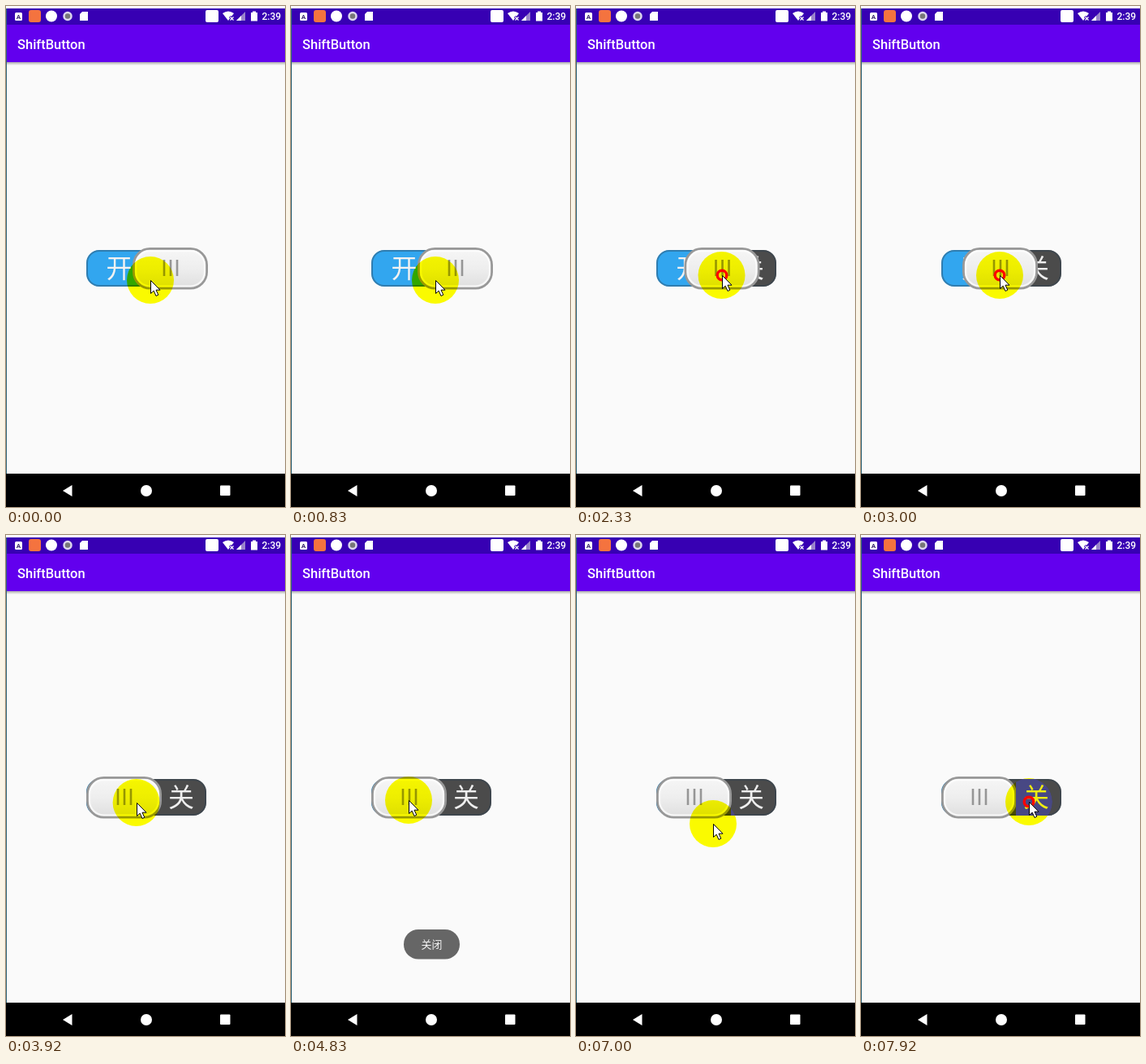
Recreate the animation shown at these times as an HTML page. Size 344 by 616 pixels, loop 8 s.

```html
<!DOCTYPE html>
<html lang="en">
<head>
<meta charset="utf-8">
<title>Toggle demo</title>
<style>
  html, body { margin: 0; width: 100%; height: 100%; overflow: hidden; background: #fafafa; }
  svg { display: block; width: 100vw; height: 100vh; }
  text { font-family: Roboto, sans-serif; font-weight: 500; }
  .cjk { font-family: "Noto Sans CJK SC", "Noto Sans CJK", sans-serif; font-weight: 400; text-anchor: middle; }
  .big { font-size: 32px; font-weight: 500; }
  .soft { filter: blur(.5px); }
  #spot { mix-blend-mode: multiply; }
</style>
</head>
<body>
<svg viewBox="0 0 344 616">
  <defs>
    <linearGradient id="silver" x2="0" y2="1">
      <stop offset="0" stop-color="#f6f6f6"/>
      <stop offset=".5" stop-color="#eee"/>
      <stop offset="1" stop-color="#dedede"/>
    </linearGradient>
    <linearGradient id="shade" x2="0" y2="1">
      <stop offset="0" stop-color="#777" stop-opacity=".6"/>
      <stop offset="1" stop-color="#777" stop-opacity="0"/>
    </linearGradient>
    <clipPath id="trackClip"><rect x="99" y="300" width="148" height="45" rx="16"/></clipPath>
    <clipPath id="offClip"><rect id="offArea" y="300" width="160" height="45"/></clipPath>
    <clipPath id="spotClip"><circle id="spotArea" r="29"/></clipPath>
  </defs>

  <!-- screen -->
  <rect width="344" height="616" fill="#fafafa"/>
  <rect width="344" height="3" fill="#fff"/>
  <rect y="3" width="344" height="20" fill="#3700b3"/>
  <rect y="23" width="344" height="46" fill="#6200ee"/>
  <rect y="69" width="344" height="4" fill="url(#shade)"/>
  <rect y="3" width="1" height="572" fill="#2f6478"/>
  <text x="14" y="53" font-size="16.5" fill="#fff">ShiftButton</text>

  <!-- status bar -->
  <g fill="#fff">
    <rect x="11" y="8" width="9" height="10" rx="1.5"/>
    <text x="15.5" y="16" font-size="8" text-anchor="middle" style="fill:#33206a;font-weight:700">A</text>
    <rect x="28" y="5" width="15" height="15" rx="3" fill="#f4733f"/>
    <circle cx="56" cy="12.5" r="7"/>
    <circle cx="76" cy="12.5" r="4.5" fill="#777" stroke="#ddd6ee" stroke-width="2.5"/>
    <path d="M94 7h7v11h-10v-8z"/>
    <rect x="246" y="5" width="16" height="15" rx="2"/>
    <path d="M267 9q7-5 14 0l-7 9z"/>
    <path d="M276 13l5 5m0-5l-5 5" stroke="#3700b3" stroke-width="3"/>
    <path d="M276.5 13.5l4 4m0-4l-4 4" stroke="#fff" stroke-width="1.2"/>
    <path d="M284 18l11-11v11z" fill="#9a84cc"/>
    <path d="M284 18l6-6v6z"/>
    <path d="M302 8h2v-1.5h4v1.5h2v10.5h-8z"/>
    <text x="315.5" y="17" font-size="12">2:39</text>
  </g>

  <!-- navigation bar -->
  <rect y="575" width="344" height="41" fill="#000"/>
  <g fill="#fff">
    <path d="M70 596l11.5-7v14z"/>
    <circle cx="173" cy="596" r="7"/>
    <rect x="264" y="589.5" width="12.5" height="12.5" rx="1"/>
  </g>

  <!-- toggle -->
  <g class="soft">
    <g clip-path="url(#trackClip)">
      <rect x="99" y="300" width="74" height="45" fill="#32a6ef"/>
      <rect x="173" y="300" width="74" height="45" fill="#4b4b4b"/>
    </g>
    <rect x="100" y="301" width="146" height="43" rx="15" fill="none" stroke="#2c4050" stroke-opacity=".4" stroke-width="2"/>
    <text class="cjk big" x="139.5" y="334" fill="#f2f2f2">开</text>
    <text class="cjk big" x="216" y="334" fill="#eee">关</text>
  </g>
  <g id="thumb" class="soft">
    <rect x="1.5" y="298.5" width="90" height="48.5" rx="20" fill="url(#silver)" stroke="#989898" stroke-width="3"/>
    <rect x="4" y="301" width="85" height="43.5" rx="17.5" fill="none" stroke="#fff" stroke-opacity=".7" stroke-width="2.5"/>
    <path d="M39 312v20m8-20v20m8-20v20" stroke="#969696" stroke-width="2.6"/>
  </g>

  <g id="toast">
    <rect x="139" y="485" width="69" height="36.5" rx="18" fill="#666"/>
    <text class="cjk" x="173.5" y="508" font-size="13" fill="#f4f4f4">关闭</text>
  </g>

  <!-- pointer -->
  <circle id="spot" r="29" fill="#ff0"/>
  <g clip-path="url(#trackClip)"><g clip-path="url(#offClip)"><g clip-path="url(#spotClip)">
    <rect x="99" y="300" width="148" height="45" fill="#484884"/>
    <text class="cjk big" x="216" y="334" fill="#f0ee10">关</text>
  </g></g></g>
  <g id="pointer">
    <circle id="ring" r="5.8" fill="none" stroke="#f00" stroke-width="3.4"/>
    <path d="M.5.5v16l3.7-3.3 2.8 6.3 2.8-1.3-2.8-6h5z" fill="#fff" stroke="#000"/>
  </g>
</svg>
<script>
// Times are in ticks, twelve per second.
const LOOP = 8000, TICKS = 96;
const PRESS = 20, RELEASE = 42, PRESS_AGAIN = 95;
const THUMB_LEFT = 99, THUMB_RIGHT = 156, THUMB_WIDTH = 92;

const HOME = { x: 178, y: 337 };
const MOVES = [
  { from: 15, to: 20, x: 187, y: 331 },
  { from: 21, to: 36, x: 171, y: 331 },
  { from: 45, to: 50, x: 145, y: 326 },
  { from: 65, to: 74, x: 148, y: 324 },
  { from: 78, to: 81, x: 169, y: 355 },
  { from: 87, to: 91, x: 207, y: 328 }
];

const part = id => document.getElementById(id);
const set = (id, values) => {
  for (const key in values) part(id).setAttribute(key, values[key]);
};
const clamp = (value, low, high) => Math.min(high, Math.max(low, value));
const ramp = (tick, from, to) => clamp((tick - from) / (to - from), 0, 1);
const mix = (a, b, amount) => a + (b - a) * amount;

function pointerAt(tick) {
  return MOVES.reduce((at, move) => {
    const done = ramp(tick, move.from, move.to);
    return { x: mix(at.x, move.x, done), y: mix(at.y, move.y, done) };
  }, HOME);
}

// The thumb follows the pointer while held, then glides to the left stop.
function thumbAt(tick) {
  if (tick < PRESS + 2) return THUMB_RIGHT;
  const held = pointerAt(Math.min(tick, RELEASE)).x - THUMB_WIDTH / 2;
  return mix(clamp(held, THUMB_LEFT, THUMB_RIGHT), THUMB_LEFT, ramp(tick, RELEASE - 1, RELEASE + 4));
}

function draw(time) {
  let tick = Math.floor((time % LOOP + 4) * 12 / 1000) % TICKS;
  const pressed = tick >= PRESS && tick < RELEASE || tick >= PRESS_AGAIN;
  if (tick % 6 === 3) tick--;

  const { x, y } = pointerAt(tick);
  const left = thumbAt(tick);
  set('thumb', { transform: `translate(${left} 0)` });
  set('offArea', { x: left + THUMB_WIDTH });
  set('spot', { cx: x, cy: y });
  set('spotArea', { cx: x, cy: y });
  set('pointer', { transform: `translate(${Math.round(x)} ${Math.round(y)})` });
  set('ring', { opacity: pressed ? 1 : 0 });
  set('toast', { opacity: ramp(tick, 47, 53) - ramp(tick, 65, 72) });
}

const start = performance.now();
function loop() {
  draw(performance.now() - start);
  requestAnimationFrame(loop);
}
loop();
</script>
</body>
</html>
```
